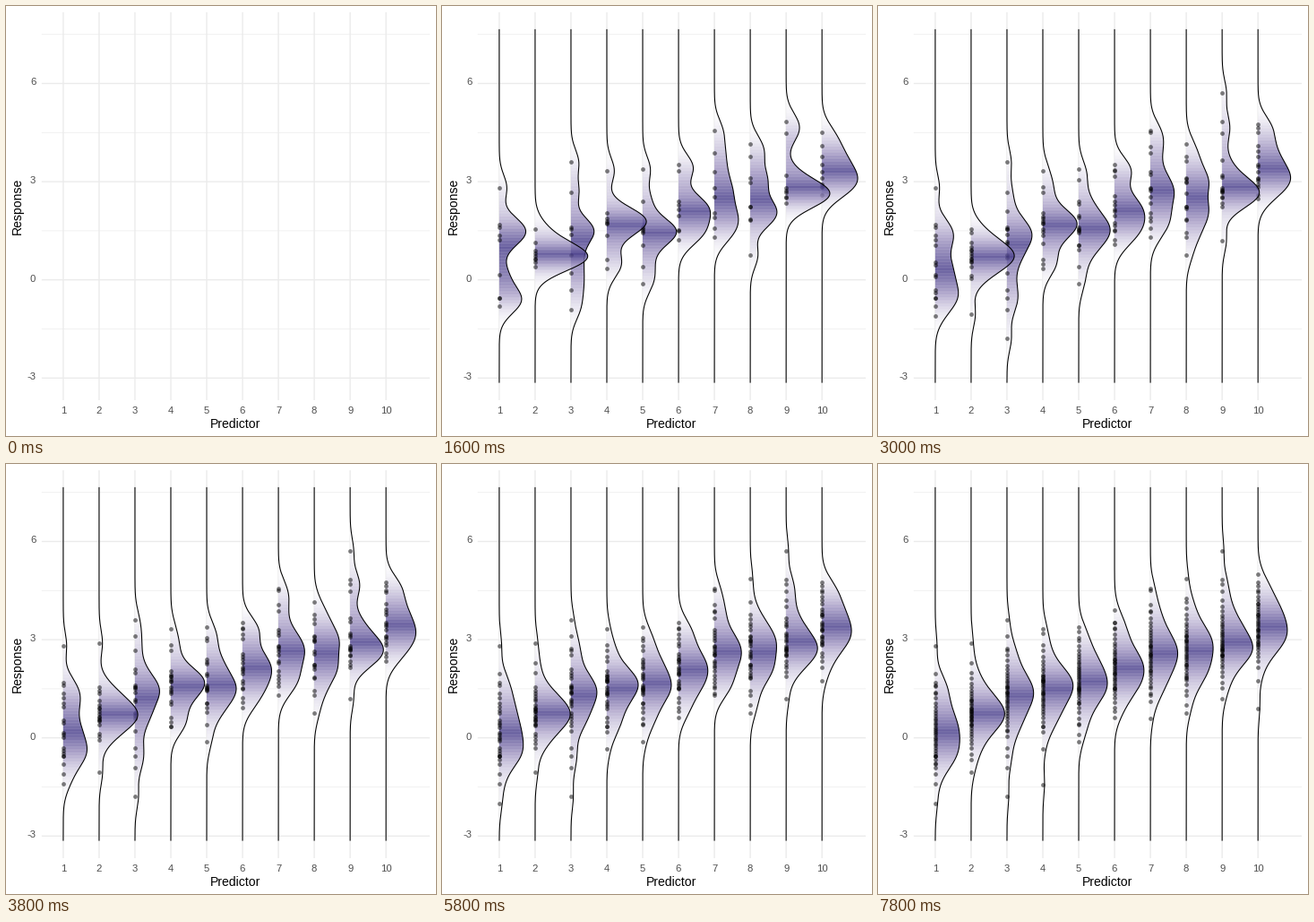
A matplotlib script for the animation above (8000 ms loop, 480 by 480 pixels).

```python
import numpy as np
import matplotlib.pyplot as plt
from matplotlib.animation import FuncAnimation
from matplotlib.collections import PolyCollection
from matplotlib.colors import LinearSegmentedColormap

SIZE, DPI = 480, 100
PT = 72 / DPI                      # points per pixel
X0, DX = 63.9, 40.03               # first column, column spacing
Y0, UNIT = 305.7, 36.53            # pixel row of zero, pixels per unit
BW, HEIGHT = 0.382, 75             # kernel width, height of one full kernel
LATE, STEP, SPREAD = 33, 13, 1.25
CMAP = LinearSegmentedColormap.from_list("ridge", ["white", "#a499c4", "#483d8b"])

# per predictor: first responses, then low, middle, high and arrival offset
GROUPS = [
    ([2.82, 1.68, 1.37, 1.62, -.55, -.55, -.8], -2, .15, 1.95, 14),
    ([1.15, .72, .4, .82, .65, .9, .55], -1.05, .75, 2.9, 4),
    ([2.68, .22, -.9, 1.55, -.3, 3.6, 1.4], -1.8, 1.3, 3.1, 7),
    ([1.88, 1.72, .35, 1.8, 1.35, 3.33, 1.75], -1.42, 1.42, 3.2, 26),
    ([1.5, .4, 1.43, 1.05, 1.55, 3.38, -.12], .1, 1.85, 3.25, 27),
    ([3.53, 2.28, 1.95, 2.4, 1.53, 3.33, 1.5], .62, 2.1, 3.9, 20),
    ([4.55, 2.8, 2.05, 3.88, 2.55, 1.57, 1.3], .6, 2.6, 4.5, 31),
    ([3.1, 1.83, 2.23, 2.97, 1.85, 4.15, .75], 1, 2.7, 4.87, 13),
    ([2.8, 2.53, 2.67, 2.73, 2.5, 4.83, 4.47], 1.2, 2.95, 5.72, 2),
    ([4.5, 3.1, 3.3, 4.1, 2.92, 3.77, 2.85], .9, 3.4, 5, 25),
]


def logit(rank):
    u = (np.asarray(rank) + 0.5) / LATE
    return np.log(u / (1 - u))


def responses(first, low, mid, high, offset):
    """First values, then evenly spread quantiles in a mixed order."""
    rank = (STEP * (np.arange(LATE) - offset)) % LATE
    below = mid - min(SPREAD, 0.8 * (mid - low))
    above = mid + min(SPREAD, 0.8 * (high - mid))
    knots = logit([0, 2, LATE // 2, LATE - 3, LATE - 1])
    late = np.interp(logit(rank), knots, [low, below, mid, above, high])
    return np.concatenate([first, late])


def row(value):
    return Y0 - UNIT * value


fig = plt.figure(figsize=(SIZE / DPI, SIZE / DPI), dpi=DPI, facecolor="white")
ax = fig.add_axes([0, 0, 1, 1])
ax.set_xlim(0, SIZE)
ax.set_ylim(SIZE, 0)
ax.axis("off")


def grid(xs, ys, width):
    ax.plot(xs, ys, color="#ebebeb", lw=width * PT, snap=False,
            solid_capstyle="butt", zorder=1)


def label(x, y, text, size, color, **kw):
    ax.text(x, y, text, fontsize=size * PT, color=color,
            family=["Liberation Sans"], **kw)


LEFT, RIGHT, TOP, BOTTOM = 39.8, 473, 7, 440
for v in np.arange(-1.5, 8, 3):
    grid([LEFT, RIGHT], [row(v)] * 2, 0.68)
for v in range(-3, 7, 3):
    grid([LEFT, RIGHT], [row(v)] * 2, 1.36)
    label(33.3, row(v) + 1.8, str(v), 11.2, "#4d4d4d", ha="right", va="baseline")
for k in range(10):
    x = X0 + DX * k
    grid([x, x], [TOP, BOTTOM], 1.36)
    label(x, 455.3, str(k + 1), 11.2, "#4d4d4d", ha="center", va="baseline")
label(256.4, 471, "Predictor", 14, "black", ha="center", va="baseline")
label(17, 223.7, "Response", 14, "black", ha="center", va="baseline",
      rotation=90, rotation_mode="anchor")

levels = np.linspace(-3.146, 7.66, 512)
rows = row(levels)


class Ridge:
    def __init__(self, k, data):
        self.x, self.data = X0 + DX * k, data
        z = 10 + 3 * (9 - k)       # left ridges cover right ones
        self.fill = PolyCollection([], edgecolors="none", linewidths=0, zorder=z)
        ax.add_collection(self.fill, autolim=False)
        self.line, = ax.plot([], [], color="black", lw=1.07 * PT, snap=False,
                             solid_capstyle="butt", zorder=z + 1)
        self.dots = ax.scatter([], [], s=(4.8 * PT) ** 2, color="black",
                               alpha=0.5, linewidths=0, zorder=z + 2)
        self.parts = (self.fill, self.line, self.dots)

    def show(self, n):
        for part in self.parts:
            part.set_visible(n > 0)
        if not n:
            return
        pts = self.data[:n]
        gap = (levels[:, None] - pts) / BW
        dens = np.exp(-gap ** 2 / 2).mean(axis=1)
        edge = self.x + HEIGHT * dens
        ecdf = np.cumsum(dens) / dens.sum()
        tail = 1 - 2 * np.abs(0.5 - ecdf)
        i = np.flatnonzero(dens[:-1] * HEIGHT > 0.02)
        base = np.full(len(i), self.x)
        quads = np.stack([
            np.column_stack([base, rows[i]]),
            np.column_stack([edge[i], rows[i]]),
            np.column_stack([edge[i + 1], rows[i + 1]]),
            np.column_stack([base, rows[i + 1]]),
        ], axis=1)
        self.fill.set_verts(quads)
        self.fill.set_facecolor(CMAP(tail[i]))
        self.line.set_data(edge, rows)
        self.dots.set_offsets(np.column_stack([np.full(n, self.x), row(pts)]))


ridges = [Ridge(k, responses(*g)) for k, g in enumerate(GROUPS)]


def update(frame):
    n = frame + 1 if frame >= 2 else 0
    for ridge in ridges:
        ridge.show(n)
    return []


anim = FuncAnimation(fig, update, frames=40, interval=200, repeat=True,
                     repeat_delay=0, blit=False)
plt.show()
```
